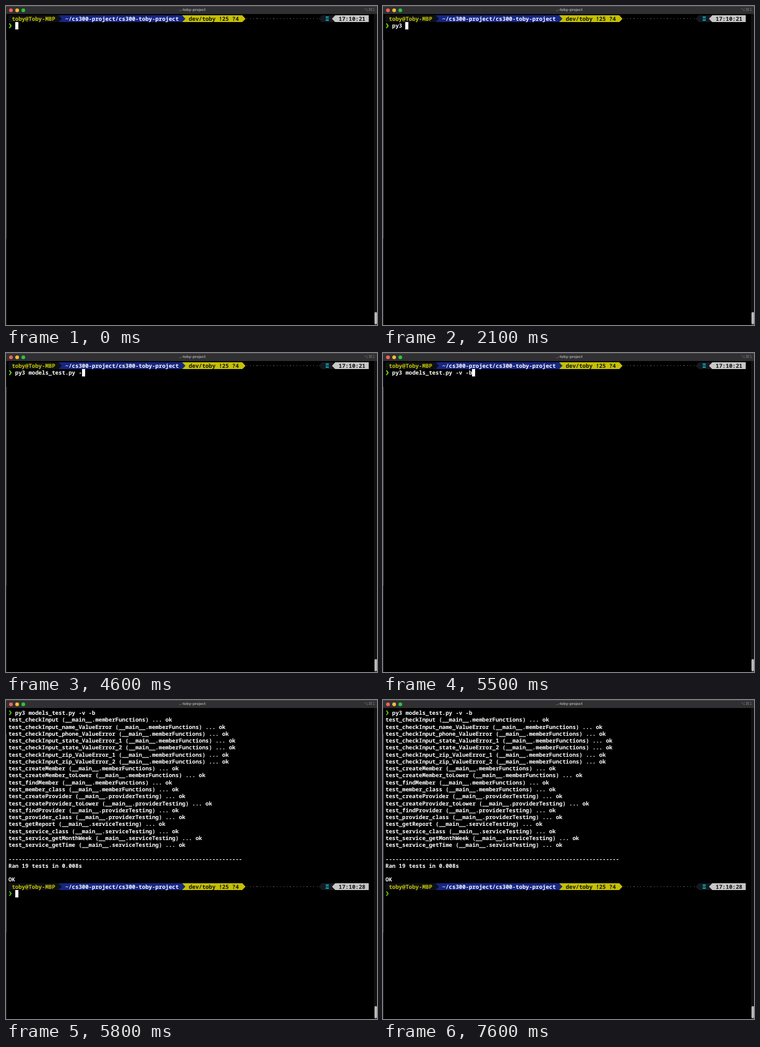
An HTML page that plays this animation: 600 px wide and 517 px high, repeating every 8000 ms.

```html
<!DOCTYPE html>
<html lang="en">
<head>
<meta charset="utf-8">
<title>Terminal</title>
<style>
  html, body { margin: 0; width: 100%; height: 100%; overflow: hidden; background: #000; }
  #stage {
    --w: 5.4px; --h: 11.27px; --top: 15.1px;
    --n: 0; --cmd: 1; --row: 1; --back: 0; --bar: 0;
    position: relative; width: 600px; height: 517px; overflow: hidden;
    background: #000; color: #fff;
    font: 700 9px/11.27px "Noto Sans Mono", "DejaVu Sans Mono", monospace;
    text-rendering: geometricPrecision; font-variant-ligatures: none;
    white-space: pre;
    animation: type 8s step-end infinite, run 8s step-end infinite;
  }
  #stage div, #stage i, #stage b, pre { position: absolute; margin: 0; font-style: normal; }
  pre { font: inherit; }

  /* window frame */
  #title {
    left: 0; top: 0; width: 600px; height: 13px; background: #303033;
    box-shadow: inset 0 1px #48484a; z-index: 5;
    font: 700 6px/13px Inter, Roboto, sans-serif; color: #a5a5a7;
  }
  #title span { position: absolute; left: 1px; width: 600px; text-align: center; }
  #title b { right: 3px; font: 400 6.5px/13px "DejaVu Sans", sans-serif; color: #77777a; }
  #title i { top: 3.6px; width: 6px; height: 6px; border-radius: 50%; background: var(--c); }
  #edge { left: 0; top: 13px; width: 1px; height: 504px;
    background: linear-gradient(#161616 42px, #4a4a4a 42px 364px, #262626 364px); }
  #track { left: 595px; top: 13px; width: 5px; height: 504px; background: #101010; }
  #thumb { left: 596px; top: 496px; width: 4px; height: 20px; border-radius: 2px; background: #b8b8b8; }

  /* prompt bar */
  #bar { left: 4px; top: calc(var(--top) + var(--bar) * var(--h)); width: 584px; height: var(--h); }
  .seg {
    left: calc(var(--a) * var(--w)); width: calc((var(--z) - var(--a)) * var(--w));
    top: 0; height: 100%; background: var(--c);
    clip-path: polygon(0 0, calc(100% - 5.4px) 0, 100% 50%, calc(100% - 5.4px) 100%, 0 100%);
  }
  .left { margin-left: -.6px !important;
    clip-path: polygon(5.4px 0, 100% 0, 100% 100%, 5.4px 100%, 0 50%); }
  #bar span { position: absolute; top: 0; left: calc(var(--x) * var(--w)); }
  #dots { left: 383.4px; top: 5px; width: 118.8px; height: 1.2px;
    background: repeating-linear-gradient(90deg, transparent 0 2.1px, #666 2.1px 3.3px, transparent 3.3px 5.4px); }
  #jobs { left: 512.6px; top: 2.4px; width: 5.2px; height: 7px;
    background: repeating-linear-gradient(#12a3b4 0 1.6px, transparent 1.6px 2.7px); }
  .chev { left: 4.6px; width: 4.6px; height: 7.6px; margin-top: 1.9px !important; background: #5fd700;
    top: calc(var(--top) + var(--r) * var(--h));
    clip-path: polygon(0 0, 40% 0, 100% 50%, 40% 100%, 0 100%, 56% 50%); }

  /* command, cursor, output */
  #cmd { left: 14.8px; top: calc(var(--top) + var(--cmd) * var(--h));
    width: calc(var(--n) * var(--w)); height: 12px; overflow: hidden; }
  #cursor { left: calc(14.8px + (var(--n) - var(--back)) * var(--w));
    top: calc(var(--top) + var(--row) * var(--h) + .1px);
    width: 5.4px; height: 11.1px; background: #fff; animation: blink 8s step-end infinite; }
  #out { left: 4px; top: calc(var(--top) + var(--h)); animation: show 8s step-end infinite; }
  #t1 { animation: show 8s step-end infinite reverse; }
  #t1 { animation: hide 8s step-end infinite; }
  #t2 { animation: show 8s step-end infinite; }

  @keyframes type {
    0% { --n: 0; } 15% { --n: 1; } 17.5% { --n: 2; } 20% { --n: 3; } 23.75% { --n: 4; }
    31.25% { --n: 5; } 33.75% { --n: 6; } 36.25% { --n: 7; }
    40% { --n: 10; } 42.5% { --n: 11; } 44.75% { --n: 19; }
    57.25% { --n: 20; } 60% { --n: 21; } 62.5% { --n: 22; } 65% { --n: 23; }
    67.25%, 100% { --n: 24; }
  }
  @keyframes run {
    0% { --cmd: 1; --row: 1; --back: 0; --bar: 0; }
    71% { --cmd: 0; --row: 1; --back: 26; --bar: -9; }
    72.25%, 100% { --cmd: 0; --row: 26; --back: 24; --bar: 25; }
  }
  @keyframes blink {
    0% { opacity: 1; } 6.25% { opacity: 0; } 12.5% { opacity: 1; }
    82.25% { opacity: 0; } 88.5% { opacity: 1; } 94.75%, 100% { opacity: 0; }
  }
  @keyframes show { 0% { visibility: hidden; } 72.25%, 100% { visibility: visible; } }
  @keyframes hide { 0% { visibility: visible; } 72.25%, 100% { visibility: hidden; } }
</style>
</head>
<body>
<div id="stage"><div id="edge"></div><div id="track"></div><div id="thumb"></div>
<div id="bar">
<div class="seg" style="--a:52;--z:71;--c:#c5c005"></div>
<div class="seg" style="--a:15;--z:53;--c:#172683"></div>
<div class="seg" style="--a:0;--z:16;--c:#0e1113"></div>
<div class="seg left" style="--a:93;--z:108;--c:#14191e"></div>
<div class="seg left" style="--a:97;--z:108;--c:#c7c7c7"></div>
<span style="--x:1;color:#c7c400">toby@Toby-MBP</span>
<span style="--x:17">~/cs300-project/cs300-toby-project</span>
<span style="--x:54;color:#111">dev/toby !25 ?4</span>
<div id="dots"></div><div id="jobs"></div>
<span id="t1" style="--x:98.9;color:#111">17:10:21</span>
<span id="t2" style="--x:98.9;color:#111">17:10:28</span>
</div>
<div class="chev" style="--r:var(--cmd)"></div>
<div class="chev" style="--r:calc(var(--bar) + 1)"></div>
<pre id="cmd">py3 models_test.py -v -b</pre>
<pre id="out">test_checkInput (__main__.memberFunctions) ... ok
test_checkInput_name_ValueError (__main__.memberFunctions) ... ok
test_checkInput_phone_ValueError (__main__.memberFunctions) ... ok
test_checkInput_state_ValueError_1 (__main__.memberFunctions) ... ok
test_checkInput_state_ValueError_2 (__main__.memberFunctions) ... ok
test_checkInput_zip_ValueError_1 (__main__.memberFunctions) ... ok
test_checkInput_zip_ValueError_2 (__main__.memberFunctions) ... ok
test_createMember (__main__.memberFunctions) ... ok
test_createMember_toLower (__main__.memberFunctions) ... ok
test_findMember (__main__.memberFunctions) ... ok
test_member_class (__main__.memberFunctions) ... ok
test_createProvider (__main__.providerTesting) ... ok
test_createProvider_toLower (__main__.providerTesting) ... ok
test_findProvider (__main__.providerTesting) ... ok
test_provider_class (__main__.providerTesting) ... ok
test_getReport (__main__.serviceTesting) ... ok
test_service_class (__main__.serviceTesting) ... ok
test_service_getMonthWeek (__main__.serviceTesting) ... ok
test_service_getTime (__main__.serviceTesting) ... ok

----------------------------------------------------------------------
Ran 19 tests in 0.008s

OK</pre>
<div id="cursor"></div>
<div id="title"><i style="left:5px;--c:#ff5f57"></i><i style="left:15px;--c:#febc2e"></i><i style="left:25px;--c:#28c840"></i><span>..-toby-project</span><b>⌥⌘1</b></div>
</div>
</body>
</html>
```
